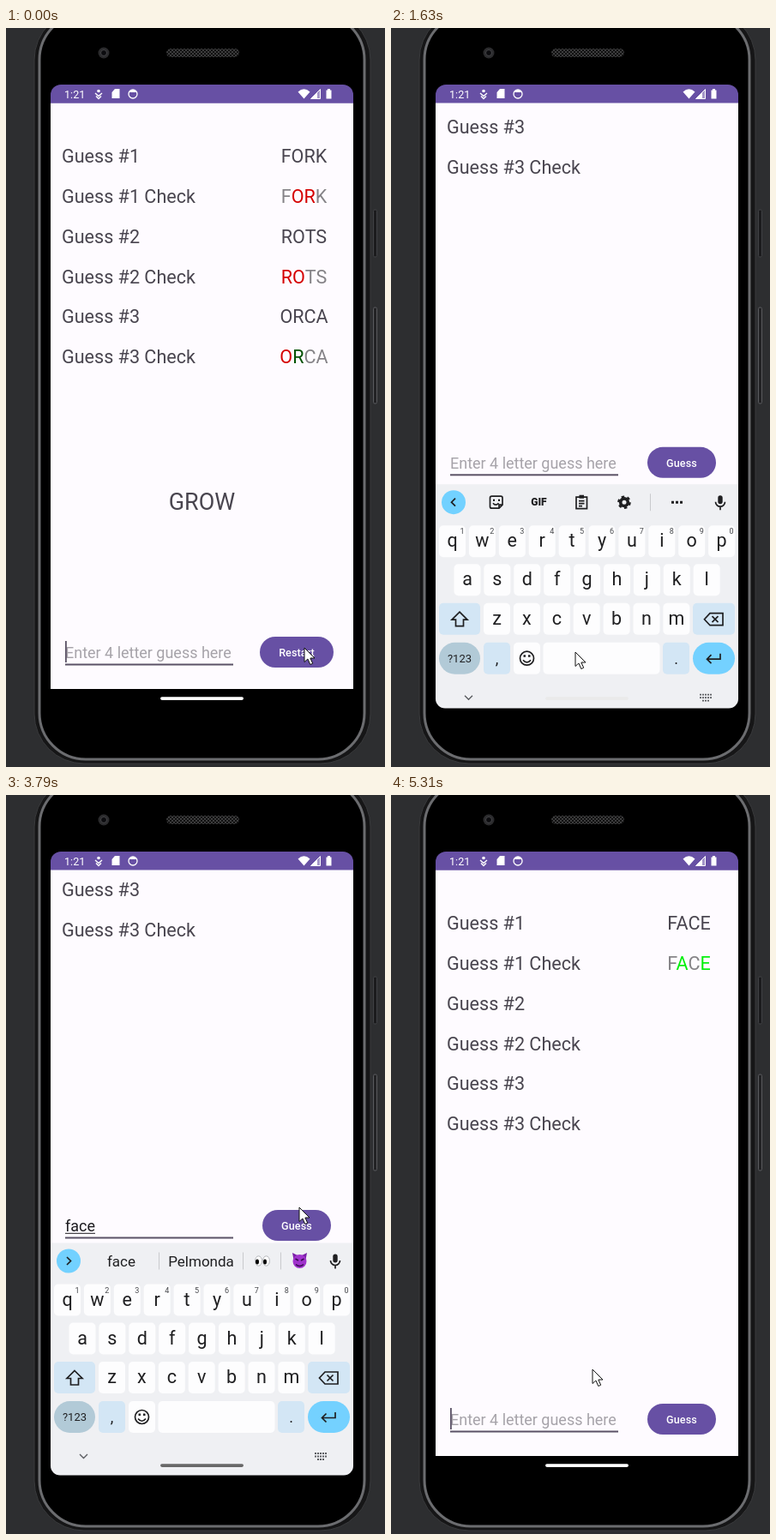
These frames come from a looping animation (442x862 px, 5380 ms). An HTML page:

```html
<!DOCTYPE html>
<html lang="en">
<head>
<meta charset="utf-8">
<title>Word guess</title>
<style>
html, body { margin: 0; width: 100%; height: 100%; overflow: hidden; background: #2d2e30; }
svg { display: block; font-family: Roboto, Arial, sans-serif; }
.mid { text-anchor: middle; }
.big { font-size: 21.57px; fill: #49454f; }
.word { font-size: 17px; fill: #1f1f21; text-anchor: middle; }
.line { fill: none; stroke: #1f1f21; stroke-width: 1.7; }
.div { stroke: #c9cacd; stroke-width: 1; }
</style>
</head>
<body>
<svg width="442" height="862" viewBox="0 0 442 862">
  <defs>
    <clipPath id="appClip"><rect x="52" y="87.5" width="353" height="706"/></clipPath>
    <clipPath id="screenClip"><rect x="52" y="66" width="353" height="727.5" rx="11"/></clipPath>
    <pattern id="mesh" width="4" height="4" patternUnits="userSpaceOnUse">
      <rect width="4" height="4" fill="#111"/>
      <path d="M0 0l4 4M4 0L0 4" stroke="#3c3c3d"/>
    </pattern>
  </defs>

  <!-- phone body -->
  <rect x="428.5" y="212" width="4" height="55" rx="1.5" fill="#1b1b1d" stroke="#404144"/>
  <rect x="428.5" y="326" width="4" height="112" rx="1.5" fill="#222224" stroke="#5a5b5e"/>
  <rect x="33" y="-21" width="392" height="879" rx="58" fill="#161617" stroke="#3a3b3d"/>
  <rect x="39" y="-17" width="379" height="870" rx="54" fill="#000" stroke="#6b6c6f" stroke-width="3"/>
  <circle cx="114" cy="29" r="6.5" fill="#2b2b2d"/>
  <circle cx="114" cy="29" r="3.5" fill="#0c0c0f" stroke="#454548"/>
  <rect x="187" y="24" width="85" height="10" rx="5" fill="url(#mesh)"/>

  <!-- status bar -->
  <path d="M52 88V78a12 12 0 0 1 12-12H393a12 12 0 0 1 12 12V88z" fill="#6750a4"/>
  <g fill="#fff">
    <text x="68" y="81.7" font-size="12.6">1:21</text>
    <circle cx="108" cy="73.5" r="1.8"/>
    <path d="M104 76l4 3.5 4-3.5M105 79.500l3 3 3-3" fill="none" stroke="#fff" stroke-width="1.4"/>
    <path d="M127 71h5.500v11h-9V75z"/>
    <circle cx="148" cy="77" r="5" fill="none" stroke="#fff" stroke-width="1.3"/>
    <path d="M144 75h8l-2-3h-4z"/>
    <path d="M340.500 74.500q7-6.500 14 0l-7 8z"/>
    <path d="M366.500 71.500v11h-11z" fill-opacity=".4"/>
    <path d="M363 75v7.500h-7.500z"/>
    <path d="M366.500 71.500v11h-11z" fill="none" stroke="#fff"/>
    <path d="M373.500 72.500h1.500v-1.500h3v1.500h1.500v10h-6z"/>
  </g>

  <!-- app -->
  <g clip-path="url(#appClip)">
    <g id="app">
      <rect x="52" y="87.5" width="353" height="683.5" fill="#fefbff"/>
      <g id="rows"></g>
      <text id="answer" class="mid" x="228.500" y="562.300" font-size="26.97" fill="#49454f">GROW</text>
      <rect x="69" y="741.500" width="196" height="2" fill="#5b5266"/>
      <text id="hint" x="69" y="735" font-size="17.98" fill="#a6a3a9">Enter 4 letter guess here</text>
      <text id="typed" x="69" y="735" font-size="17.98" fill="#1c1b1f"></text>
      <rect id="under" x="69" y="736.800" width="0" height="1" fill="#1c1b1f"/>
      <rect id="caret" x="69" y="715" width="1.800" height="25" fill="#5b5266"/>
      <rect id="button" y="710" height="36" rx="18" fill="#6750a4"/>
      <rect id="ripple" y="710" height="36" rx="18" fill="#fff"/>
      <text id="label" class="mid" x="339" y="732.800" font-size="12.59" font-weight="500" letter-spacing=".09" fill="#fff"></text>
    </g>
  </g>

  <!-- keyboard -->
  <g clip-path="url(#screenClip)">
    <g id="keyboard">
      <rect x="52" y="522.500" width="353" height="272" fill="#eff0f3"/>
      <circle cx="73" cy="543.500" r="14" fill="#72d1ff"/>
      <path id="chevron" class="line"/>
      <g id="tools">
        <path class="line" d="M126 550.500H117.500a2 2 0 0 1-2-2V538.500a2 2 0 0 1 2-2H128a2 2 0 0 1 2 2V546.500zM126 550v-3.500h4M119 544.500q3 4 6.500 0"/>
        <path d="M119 540h2v2h-2zM125 540h2v2h-2z"/>
        <text class="mid" x="172.500" y="547.700" font-size="12" font-weight="900" fill="#1f1f21">GIF</text>
        <path class="line" d="M216 537.500h12.500v13.500H216zM219 542h6.500M219 545h6.500M219 548h4"/>
        <path class="line" stroke-width="3" d="M219.500 537h5.500" style="stroke-width:4"/>
        <circle class="line" cx="272" cy="543.500" r="4.300" style="stroke-width:3.600"/>
        <circle class="line" cx="272" cy="543.500" r="6.600" style="stroke-width:2.400" stroke-dasharray="3.450"/>
        <path class="div" d="M302.500 533.500v20"/>
        <path d="M327 542h3v3h-3zM332 542h3v3h-3zM337 542h3v3h-3z" fill="#1f1f21"/>
      </g>
      <g id="words">
        <text class="word" x="137" y="549.500"></text>
        <text class="word" x="228" y="549.500"></text>
        <text class="word" x="320" y="549.500"></text>
        <path class="div" d="M183.500 533.500v20M274.500 533.500v20"/>
      </g>
      <g id="emojis">
        <text class="word" x="134.500" y="549.500">face</text>
        <text class="word" x="227.500" y="549.500">Pelmonda</text>
        <path class="div" d="M178.500 533.500v20M276.500 533.500v20M320.500 533.500v20"/>
        <g fill="#fff" stroke="#b5b7bb"><ellipse cx="294.500" cy="543.500" rx="4" ry="5.700"/><ellipse cx="303.500" cy="543.500" rx="4" ry="5.700"/></g>
        <ellipse cx="293" cy="544.500" rx="2" ry="3"/><ellipse cx="302" cy="544.500" rx="2" ry="3"/>
        <path d="M334 534l6 3h5l6-3-1.500 8h-14z" fill="#7a1fa8"/>
        <circle cx="342.500" cy="544" r="8" fill="#a033cc"/>
        <path d="M337.500 541l3.500 2M347.500 541l-3.500 2M338 547.500q4.500 4 9 0" fill="none" stroke="#3b0b55" stroke-width="1.600"/>
      </g>
      <rect x="381.300" y="535.500" width="5.400" height="10" rx="2.700" fill="#1f1f21"/>
      <path class="line" d="M378.500 543a5.500 5.500 0 0 0 11 0M384 548.500v4"/>
      <g id="keys"></g>
      <path class="line" d="M80 671.500l9 9h-4.500v7.500h-9v-7.500H71z"/>
      <path class="line" d="M372 673h15v14H372l-6.500-7zM374.500 676.500l7 7M381.500 676.500l-7 7"/>
      <path class="line" d="M384 720v6.500H369M373.500 721.500l-5 5 5 5"/>
      <circle class="line" cx="158.500" cy="725.500" r="8"/>
      <path class="line" d="M154 727.500q4.500 5.500 9 0"/>
      <path d="M154.500 721.500h2.500v2.500h-2.500zM160 721.500h2.500v2.500H160z" fill="#1f1f21"/>
      <path d="M86 769l4.500 4.500 4.500-4.500" fill="none" stroke="#5c5e62" stroke-width="1.400"/>
      <path d="M360 768h14M360 771.500h14M363 775h8" stroke="#5c5e62" stroke-width="1.800" stroke-dasharray="2 1"/>
    </g>
  </g>
  <rect id="handle" x="180" y="780.300" width="97" height="3.600" rx="1.800"/>
  <path id="cursor" d="M0 0V16.500L3.900 13 6.800 19.500 9.700 18.200 6.900 12H12z" fill="#fff" stroke="#111" stroke-width="1"/>
</svg>

<script>
const LOOP = 5380;
const $ = id => document.getElementById(id);
const set = (id, attrs) => { for (const k in attrs) $(id).setAttribute(k, attrs[k]); };
const show = (id, on) => $(id).style.display = on ? '' : 'none';
const clamp = v => Math.max(0, Math.min(1, v));
// remaining share of a decelerating move
const rest = (t, start, length, power) => (1 - clamp((t - start) / length)) ** power;

// linear interpolation through [time, value] points
function track(t, points) {
  let a = points[0];
  for (const b of points) {
    if (t < b[0]) return b === a ? a[1] : a[1] + (b[1] - a[1]) * (t - a[0]) / (b[0] - a[0]);
    a = b;
  }
  return a[1];
}

// result rows
const GRAY = '#858387', RED = '#d50000', DARK = '#005000';
for (let i = 0; i < 6; i++) {
  const y = 157 + 46.85 * i, name = `Guess #${(i >> 1) + 1}${i % 2 ? ' Check' : ''}`;
  $('rows').innerHTML += `<text class="big" x="65" y="${y}">${name}</text>
    <text class="big mid" id="row${i}" x="347.500" y="${y}"></text>`;
}
const spans = (word, colors) => [...word].map((c, i) => `<tspan fill="${colors[i]}">${c}</tspan>`).join('');
const oldRows = ['FORK', spans('FORK', [GRAY, RED, RED, GRAY]), 'ROTS', spans('ROTS', [RED, RED, GRAY, GRAY]),
  'ORCA', spans('ORCA', [RED, DARK, GRAY, GRAY])];
const newRows = green => ['FACE', spans('FACE', [GRAY, green, GRAY, green])];

// keys
let keys = '';
function key(x, y, w, text, size, fill = '#fdfdfe', rx = 5, dy = 7) {
  keys += `<rect x="${x}" y="${y}" width="${w}" height="37" rx="${rx}" fill="${fill}"/>
    <text class="mid" x="${x + w / 2}" y="${y + 18 + dy}" font-size="${size}" fill="#1f1f21">${text}</text>`;
}
[['qwertyuiop', 56, 570.5], ['asdfghjkl', 73.500, 615.5], ['zxcvbnm', 108, 661]].forEach(([row, x0, y], r) =>
  [...row].forEach((c, i) => {
    const x = x0 + 34.9 * i;
    key(x, y, 31, c, 21.5);
    if (!r) keys += `<text class="mid" x="${x + 27}" y="${y + 10}" font-size="9" fill="#45474b">${(i + 1) % 10}</text>`;
  }));
const BLUE = '#d3e6f5';
key(56, 661, 48, '', 9, BLUE);
key(352, 661, 49, '', 9, BLUE);
key(56, 707, 48, '?123', 13, '#b2cad7', 18.5, 5);
key(108, 707, 31, ',', 18, BLUE);
key(143, 707, 31, '', 9);
key(177.5, 707, 136, '', 9);
key(317, 707, 31, '.', 18, BLUE);
key(352, 707, 49, '', 9, '#74d1ff', 18.5);
$('keys').innerHTML = keys;

const CLEAR = 410, OPEN = 1430, SEND = 4120;
const typeTimes = [2460, 2740, 2950, 3160];
const suggestions = [[], ['f', 'for', 'from'], ['fa', 'fast', 'far'], ['fac', 'face', 'fact']];
const caretOn = [[0, 70], [570, 1070], [1690, 2190], [2460, 3660], [SEND, 4680], [5240, LOOP]];
const cursorX = [[400, 348], [740, 222], [810, 221], [1150, 215], [3200, 215], [3300, 337], [3500, 337], [3600, 428],
  [3660, 424], [3780, 342], [3850, 342], [3990, 344], [4480, 344], [4610, 341], [5170, 236], [5300, 235]];
const cursorY = [[400, 723], [740, 732], [810, 733], [1150, 728], [3200, 728], [3300, 599], [3500, 599], [3600, 545],
  [3660, 530], [3780, 481], [3850, 481], [3990, 490], [4480, 490], [4610, 504], [5170, 664], [5300, 670]];
const handleTone = [[1480, 255], [1600, 235], [1900, 224], [2390, 162], [2530, 104], [SEND, 104], [SEND + 1, 255]];
const ripple = [[260, 0], [340, .12], [600, .1], [750, 0], [3900, 0], [3990, .12], [4500, .12], [4750, 0]];

let phase;
function fillRows(t) {
  const next = t < CLEAR ? 0 : t < SEND ? 1 : t < 4540 ? 2 : 3;
  if (next === phase) return;
  phase = next;
  const rows = [oldRows, [], newRows('#18b422'), newRows('#00f00a')][phase];
  for (let i = 0; i < 6; i++) $('row' + i).innerHTML = rows[i] || '';
}

function draw(t) {
  fillRows(t);
  show('answer', t < CLEAR);

  const closing = t >= SEND - 10;
  const pan = closing ? rest(t, 4110, 500, 3.39) : 1 - rest(t, 1460, 310, 4.8);
  const drop = closing ? 1 - rest(t, 4110, 290, 1.6) : rest(t, OPEN, 340, 3.72);
  set('app', { transform: `translate(0 ${-226 * pan})` });
  set('keyboard', { transform: `translate(0 ${271 * drop})` });
  show('keyboard', drop < 1);

  const count = t < SEND ? typeTimes.filter(s => t >= s).length : 0;
  $('typed').textContent = 'face'.slice(0, count);
  const width = count ? $('typed').getComputedTextLength() : 0;
  set('under', { width });
  set('caret', { x: 69 + width });
  show('caret', caretOn.some(([a, b]) => t >= a && t < b));
  show('hint', !count);

  // the strip keeps its last words while the keyboard slides away
  const strip = closing ? 4 : count;
  show('tools', !strip);
  show('words', strip > 0 && strip < 4);
  show('emojis', strip === 4);
  if (strip > 0 && strip < 4)
    $('words').querySelectorAll('text').forEach((e, i) => e.textContent = suggestions[strip][i]);
  set('chevron', { d: strip ? 'M71 539l4.500 4.500-4.500 4.500' : 'M75 539l-4.500 4.500 4.500 4.500' });

  const restart = t < CLEAR, box = restart ? { x: 296, width: 86 } : { x: 299, width: 80 };
  set('button', box);
  set('ripple', { ...box, opacity: track(t, ripple) });
  $('label').textContent = restart ? 'Restart' : 'Guess';

  const tone = Math.round(track(t, handleTone));
  set('handle', { fill: `rgb(${tone},${tone},${tone})`, opacity: t < SEND ? 1 : clamp((t - 4670) / 330) });
  set('cursor', { transform: `translate(${track(t, cursorX)} ${track(t, cursorY)})` });
}

const start = performance.now();
function tick() {
  draw((performance.now() - start) % LOOP);
  requestAnimationFrame(tick);
}
tick();
</script>
</body>
</html>
```
